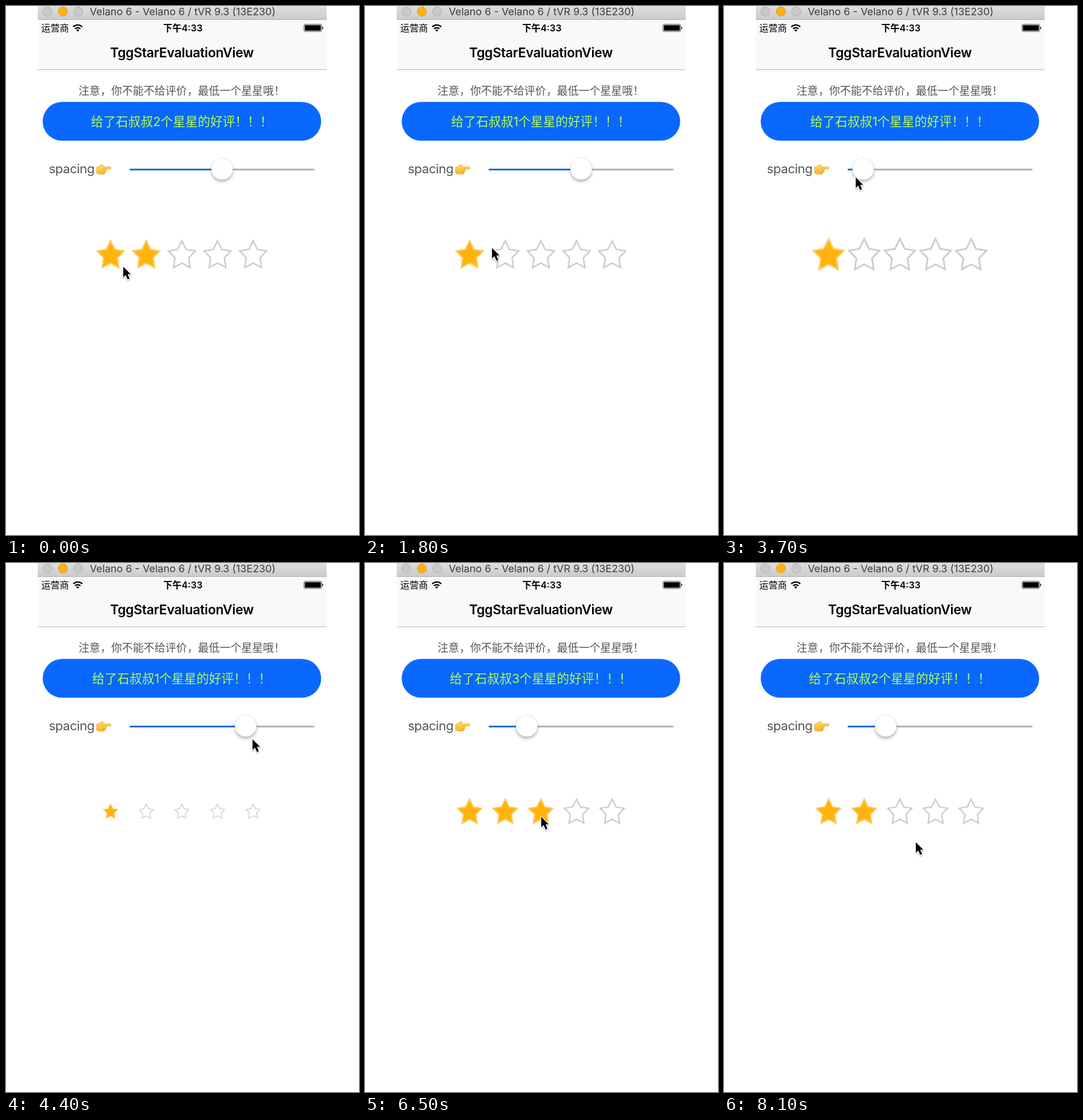
An HTML page for the animation above (8200 ms loop, 611x917 px).

```html
<!DOCTYPE html>
<html lang="zh-CN">
<head>
<meta charset="utf-8">
<title>Star rating</title>
<style>
html, body { margin: 0; width: 100%; height: 100%; overflow: hidden; background: #fff; }
svg { display: block; width: 611px; height: 917px; }
text { font-family: Inter, "Noto Sans CJK SC", "Noto Sans CJK", sans-serif; white-space: pre; }
.mid { text-anchor: middle; }
.star { stroke: #ccc; fill: #fff; stroke-width: .05; stroke-miterlimit: 6; }
.star.on { stroke: #ffcb61; fill: #ffb30d; }
</style>
</head>
<body>
<svg viewBox="0 0 611 917">
  <defs>
    <linearGradient id="bar" x2="0" y2="1">
      <stop offset="0" stop-color="#dedede"/><stop offset="1" stop-color="#cbcbcb"/>
    </linearGradient>
    <linearGradient id="skin" x2="0" y2="1">
      <stop offset="0" stop-color="#ffdc5c"/><stop offset="1" stop-color="#f8b52c"/>
    </linearGradient>
    <filter id="soft" x="-50%" y="-50%" width="200%" height="200%">
      <feDropShadow dx="0" dy="3.5" stdDeviation="2.6" flood-opacity=".28"/>
    </filter>
    <filter id="lift" x="-50%" y="-50%" width="200%" height="200%">
      <feDropShadow dx="0" dy="1.5" stdDeviation="1.2" flood-opacity=".35"/>
    </filter>
  </defs>

  <!-- window bar -->
  <rect x="55" width="500" height="24" fill="url(#bar)"/>
  <rect x="55" y="23" width="500" height="1" fill="#aeaeae"/>
  <g stroke="#b0b0b0" fill="#c9c9c9">
    <circle cx="71.5" cy="9.5" r="8"/>
    <circle cx="98.5" cy="9.5" r="8" fill="#fdb017" stroke="#e39d18"/>
    <circle cx="125" cy="9.5" r="8"/>
  </g>
  <text x="145" y="16" font-size="17.8" fill="#3c3c3c">Velano 6 - Velano 6 / tVR 9.3 (13E230)</text>

  <!-- status and navigation -->
  <rect x="55" y="24" width="500" height="86" fill="#f9f9f9"/>
  <rect x="55" y="110" width="500" height="1" fill="#b4b4b4"/>
  <text x="61" y="44" font-size="16">运营商</text>
  <g fill="none" stroke="#000" stroke-width="2.3">
    <path d="M116.4 36.2a11 11 0 0 1 15.6 0"/>
    <path d="M119.5 39.5a6.6 6.6 0 0 1 9.4 0"/>
    <path d="M124.2 44.6l-2.6-2.8a3.7 3.7 0 0 1 5.2 0z" fill="#000" stroke="none"/>
  </g>
  <text class="mid" x="306" y="44" font-size="16" font-weight="600">下午4:33</text>
  <rect x="515.8" y="31.8" width="30.6" height="12.4" rx="2.2" fill="none" stroke="#444"/>
  <rect x="517.3" y="33.3" width="27.6" height="9.4" rx="1"/>
  <path d="M547.5 36q1.6 0 1.6 2t-1.6 2z"/>
  <text class="mid" x="304.5" y="89" font-size="22.67" font-weight="600" letter-spacing="-.28">TggStarEvaluationView</text>

  <!-- page -->
  <text x="125.6" y="154" font-size="18.8" fill="#555">注意，你不能不给评价，最低一个星星哦！</text>
  <rect x="63.5" y="166.3" width="482" height="67.2" rx="33.6" fill="#0a68ff"/>
  <text id="label" class="mid" x="304" y="207.7" font-size="21.5" fill="#b2ff52"></text>
  <text x="74.2" y="290.3" font-size="22" letter-spacing="-.45" fill="#555">spacing</text>
  <g stroke="#dc9426" stroke-width=".6" stroke-linejoin="round" fill="url(#skin)">
    <path d="M156.8 279.6q2.8-.5 5-2.4 2.6-2.4 5.2-2.5 2 .1 1.2 1.9l-1.6 2.1h13.2q2.2.2 2.2 2t-2.2 2h-6.6q1.3 1.2.4 2.9-.5.9-1.3 1.1.6 1.6-1 2.6-.3 2.2-2.8 2.3h-5.2q-3.4-.2-6.5-1.7z"/>
    <path d="M167.6 282.7h5.6m-5.9 4h5m-5.2 2.6h4" fill="none"/>
  </g>

  <rect x="214" y="282" width="320" height="3" rx="1.5" fill="#b2b2b2"/>
  <rect id="track" x="214" y="282" height="3" rx="1.5" fill="#0b6cd8"/>
  <circle id="thumb" cy="282.3" r="18.8" fill="#fff" stroke="#000" stroke-opacity=".14" stroke-width=".7" filter="url(#soft)"/>
  <g id="stars"></g>
  <path id="cursor" d="M0 0V18.2L4.2 14.2L7.6 22L10.9 20.6L7.5 12.9H13Z" stroke="#fff" stroke-width="2.2"
    paint-order="stroke" stroke-linejoin="round" filter="url(#lift)"/>
</svg>
<script>
const LOOP = 8200, STEP = 100, PITCH = 61.7;
const DRAG = 2600, FIRST_GAP = .2;
const $ = id => document.getElementById(id);

// stops of the pointer: time, x, y, thumb x, stars given on arrival
const stops = [
  [0, 203, 452, 374, 2],
  [1000, 306, 447, 374, 3],
  [1700, 186, 446, 374, 1],
  [DRAG, 381, 294, 374, 1],
  [3700, 228, 297, 241, 1],
  [5200, 525, 310, 501, 1],
  [6000, 290, 306, 280, 1],
  [6500, 305, 440, 280, 3],
  [7250, 244, 440, 280, 2],
  [8100, 332, 484, 280, 2]
];

function pose(t) {
  const i = stops.findLastIndex(s => s[0] <= t);
  const a = stops[i], b = stops[i + 1] || a;
  const part = b === a ? 0 : (t - a[0]) / (b[0] - a[0]);
  const ease = Math.sin(part * Math.PI / 2);
  const [x, y, thumb] = [1, 2, 3].map(k => a[k] + (b[k] - a[k]) * ease);
  return { x, y, thumb, count: a[4] };
}

function starPath() {
  const points = [];
  for (let i = 0; i < 10; i++) {
    const r = i % 2 ? .51 : 1, a = i * Math.PI / 5;
    points.push([.475 * r * Math.sin(a), .05 - .5 * r * Math.cos(a)].map(n => n.toFixed(4)));
  }
  return "M" + points.join("L") + "Z";
}

const shape = starPath();
const stars = Array.from({ length: 5 }, () => {
  const p = document.createElementNS("http://www.w3.org/2000/svg", "path");
  p.setAttribute("d", shape);
  return $("stars").appendChild(p);
});

function draw(t) {
  const { x, y, thumb, count } = pose(t);
  const gap = t <= DRAG ? FIRST_GAP : 2 * (thumb - 233) / 282;
  const size = PITCH / (1 + gap);

  $("thumb").setAttribute("cx", thumb);
  $("track").setAttribute("width", thumb - 214);
  $("label").textContent = `给了石叔叔${count}个星星的好评！！！`;
  stars.forEach((s, i) => {
    s.setAttribute("class", i < count ? "star on" : "star");
    s.setAttribute("transform", `translate(${181 + PITCH * i} 430) scale(${size})`);
  });
  $("cursor").setAttribute("transform", `translate(${x} ${y})`);
}

const start = performance.now();
function tick() {
  const t = (performance.now() - start) % LOOP;
  draw(Math.floor(t / STEP) * STEP);
  requestAnimationFrame(tick);
}
tick();
</script>
</body>
</html>
```
